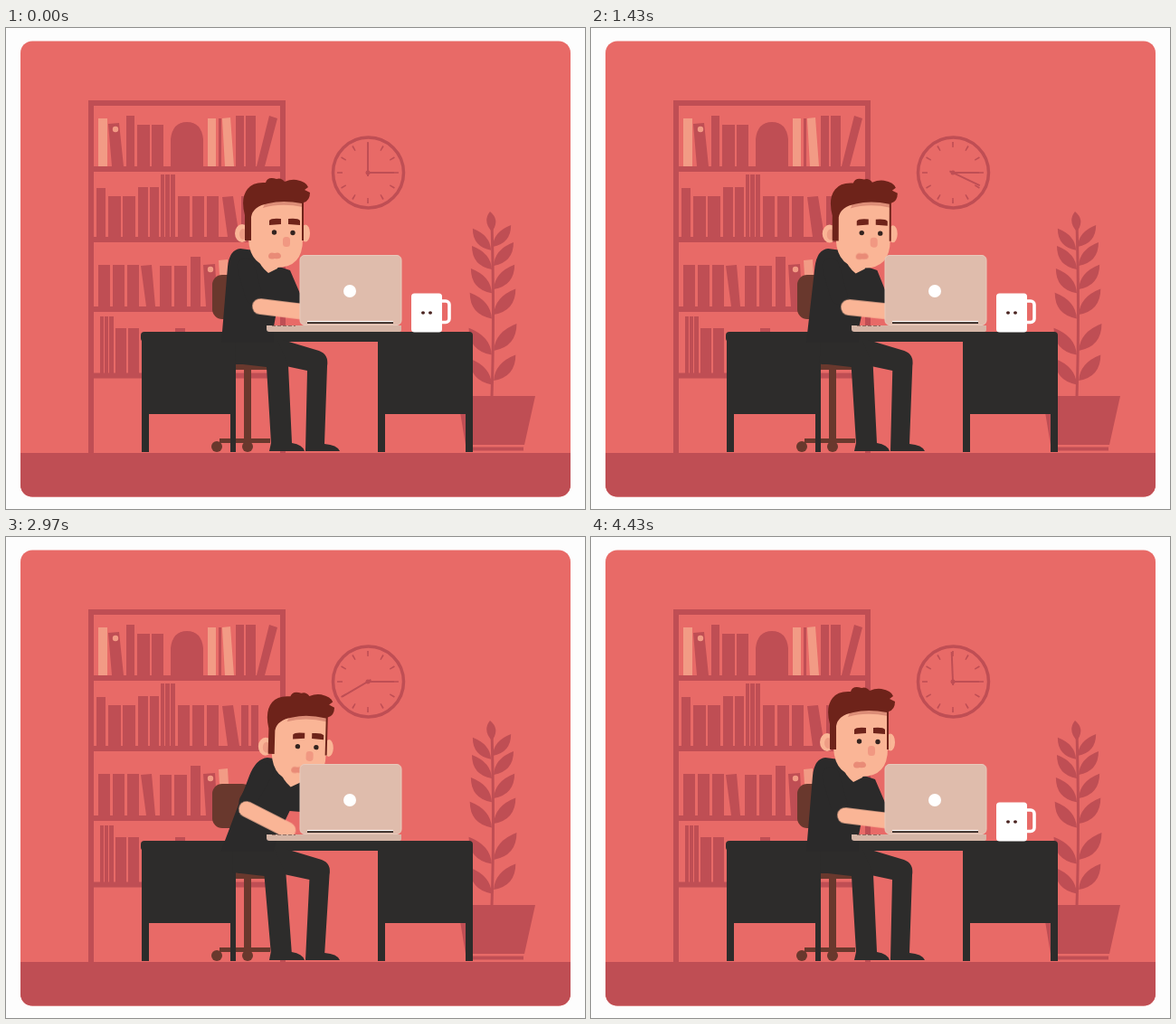
Recreate the animation shown at these times as an HTML page without scripts. Size 640 by 532 pixels, loop 4460 ms.

```html
<!DOCTYPE html>
<html lang="en">
<head>
<meta charset="utf-8">
<title>Desk work</title>
<style>
  @property --lean { syntax: '<number>'; inherits: true; initial-value: 0; }
  html, body { margin: 0; width: 100%; height: 100%; overflow: hidden; background: #fdfdfd; }
  svg { display: block; width: 100%; height: 100%; }

  .wall { fill: #e86a67; }
  .deep { fill: #bf4e54; }
  .line { fill: none; stroke: #bf4e54; }
  .peach { fill: #f29b85; }
  .dark { fill: #2d2c2b; }
  .brown { fill: #69382d; }
  .skin { fill: #fab596; }
  .hair { fill: #6e231a; }

  .minute, .man, .arm, .sleeve, .mouth, .mug { animation: 4.46s ease-in-out infinite; }
  .minute { transform-origin: 400px 160px; animation-name: turn; animation-timing-function: linear; }

  /* --lean is the sideways shift of the head in px */
  .man { animation-name: lean; }
  .head {
    transform-origin: 297px 240px;
    transform: translate(calc(var(--lean) * 1px), calc(var(--lean) * .22px)) rotate(calc(var(--lean) * .06deg));
  }
  .torso { transform-origin: 270px 346px; transform: skewX(calc(var(--lean) * -.64deg)); }
  .near, .far { transform-origin: 320px 468px; }
  .near { transform: skewX(calc(var(--lean) * .06deg)); }
  .far { transform: skewX(calc(var(--lean) * -.06deg)); }
  .arm { transform-origin: 281px 308px; animation-name: arm; }
  .sleeve { fill: none; stroke: #2b2a2a; stroke-width: 19; stroke-linecap: round; animation-name: sleeve; }
  .mouth { transform-origin: 297px 252px; animation-name: mouth; }
  .mug { transform-origin: 465px 315px; animation-name: sip; }

  @keyframes turn { to { transform: rotate(360deg); } }
  @keyframes lean {
    0%, 100% { --lean: 0; }
    19.5% { --lean: 6.5; }
    32%, 37% { --lean: 2.7; }
    48.7%, 55% { --lean: 30.5; }
    66.6% { --lean: 25.5; }
    75.6% { --lean: 12; }
  }
  @keyframes arm {
    0%, 100% { transform: translate(0, 0) rotate(7deg); }
    19.5% { transform: translate(5px, 0) rotate(7deg); }
    32%, 37% { transform: translate(4px, 1px) rotate(6deg); }
    48.7%, 55% { transform: translate(-16px, -8px) rotate(29deg); }
    66.6% { transform: translate(-15px, -7px) rotate(27deg); }
    75.6% { transform: translate(-6px, -3px) rotate(17deg); }
  }
  @keyframes sleeve {
    0%, 37%, 100% { d: path("M265 264L274 296"); }
    48.7%, 55% { d: path("M290 259L267 292"); }
    66.6% { d: path("M286 259L267 293"); }
    75.6% { d: path("M273 262L271 296"); }
  }
  @keyframes mouth {
    0%, 10%, 30%, 100% { transform: none; }
    19.5% { transform: rotate(18deg); }
  }
  @keyframes sip {
    0%, 41%, 73%, 100% { transform: translate(0, 0) rotate(0deg); }
    48.7% { transform: translate(-31px, -14px) rotate(-8deg); }
    53%, 67% { transform: translate(-72px, -18px) rotate(-8deg); }
  }
</style>
</head>
<body>
<svg viewBox="0 0 640 532" preserveAspectRatio="none">
  <defs>
    <clipPath id="card"><rect x="16" y="14.500" width="608" height="504" rx="13"/></clipPath>
    <path id="leaf" d="M0 0Q1 -18 22 -26Q22 -4 0 0"/>
    <g id="pair"><use href="#leaf" x="1"/><use href="#leaf" x="1" y="4" transform="scale(-1 1)"/></g>
  </defs>

  <g clip-path="url(#card)">
    <path class="wall" d="M16 14h608v505h-608z"/>
    <path class="deep" d="M16 470h608v49h-608z"/>
  </g>

  <g id="shelf">
    <path class="line" stroke-width="6" d="M94 470V83H306V470M94 156H306M94 234H306M94 311H306M94 384.500H306"/>
    <g class="deep">
      <path d="M113 106l12 -1 5 48h-13zM133 97h9v56h-9zM145 107h14v46h-14zM161 107h13v46h-13zM235 100h3v53h-3zM254 97h9v56h-9zM265 97h11v56h-11zM291 97l9 3 -14 53h-9z"/>
      <path d="M182 153V123Q184 104 200 104T218 123V153z"/>
      <path d="M100 177h10v54h-10zM113 186h14v45h-14zM129 186h14v45h-14zM146 176h11v55h-11zM159 176h10v55h-10zM171 162h4v69h-4zM176 162h5v69h-5zM182 162h5v69h-5zM190 186h13v45h-13zM206 186h13v45h-13zM222 186h13v45h-13zM239 187l12 -1 7 45h-13zM260 186h8v45h-8zM271 186h8v45h-8z"/>
      <path d="M102 262h13v46h-13zM118 262h13v46h-13zM134 262h13v46h-13zM149 263l12 -1 4 46h-10zM170 263h13v45h-13zM186 263h14v45h-14zM204 253h11v55h-11zM218 262l13 -1 3 47h-13z"/>
      <path d="M104 319h4v63h-4zM109 319h4v63h-4zM114 319h5v63h-5zM121 332h12v50h-12zM135 332h12v50h-12zM187 332h11v10h-11z"/>
    </g>
    <g class="peach">
      <path d="M102 100h10v53h-10zM223 100h9v53h-9zM239 100l9 -1 4 54h-10zM235 257l10 -1 3 52h-10z"/>
      <circle cx="121" cy="112" r="3.200"/><circle cx="226" cy="267" r="3.200"/>
    </g>
  </g>

  <g id="clock" class="line" stroke-width="2">
    <circle cx="400.500" cy="160" r="39" stroke-width="3.500"/>
    <!-- dash pattern yields twelve ticks -->
    <circle cx="400" cy="160" r="31" stroke-width="6" pathLength="360" stroke-dasharray="3 27" stroke-dashoffset="1.500"/>
    <path d="M400 160h29"/>
    <path class="minute" d="M400 164V127"/>
    <circle class="deep" cx="400" cy="160" r="2.500" stroke="none"/>
  </g>

  <g id="plant" class="deep">
    <path class="line" stroke-width="3" d="M537 215Q540 320 537 408"/>
    <path d="M536 224Q527 213 535 203Q546 212 538 224z"/>
    <use href="#pair" transform="translate(537 242) scale(.92)"/>
    <use href="#pair" transform="translate(538 263)"/>
    <use href="#pair" transform="translate(538 289) scale(1.050)"/>
    <use href="#pair" transform="translate(538 317) scale(1.100)"/>
    <use href="#pair" transform="translate(538 357) scale(1.150)"/>
    <use href="#pair" transform="translate(538 390) scale(1.100)"/>
    <path d="M499 407H585L573 461H508zM512 463.500h60v4h-60z"/>
  </g>

  <g id="chair" class="brown">
    <rect x="228" y="273" width="44" height="49" rx="11"/>
    <path d="M250 370h40v8h-40zM263 378h8v78h-8zM236 454h56v5h-56z"/>
    <circle cx="233" cy="463" r="6"/><circle cx="267" cy="463" r="6"/>
  </g>

  <g id="desk" class="dark">
    <rect x="149" y="336" width="367" height="11" rx="4"/>
    <path d="M150 343h104v126h-6v-42h-90v42h-8zM411 343h105v126h-8v-42h-89v42h-8z"/>
  </g>

  <g class="mug">
    <rect x="476" y="302" width="14" height="23.500" rx="4" fill="none" stroke="#fff" stroke-width="3.600"/>
    <rect x="448" y="293.500" width="34" height="43" rx="3.500" fill="#fff"/>
    <g fill="#4a2420"><ellipse cx="461" cy="315" rx="2" ry="1.700"/><ellipse cx="469" cy="315" rx="2" ry="1.700"/></g>
  </g>

  <g class="man">
    <path class="dark far" d="M254 345H306L346 357Q357 361 355 374L352 460Q366 461 369 468H331L333 379L300 372H254z"/>
    <path class="dark near" d="M254 345H300L312 373L316 459Q328 461 330 468H291L293 459L288 375L253 371z"/>
    <path class="torso" fill="#2b2a2a" d="M238 348L245 264Q247 245 259 244L282 247L291 269L302 264L314 268L326 296V305L301 303L296 330V348z"/>
    <g class="head">
      <path class="skin" d="M277 252H304L300 266L290 271Q281 264 277 252z"/>
      <ellipse class="skin" cx="261" cy="227" rx="8" ry="10"/>
      <ellipse class="skin" cx="331" cy="227" rx="5" ry="9.500"/>
      <ellipse cx="262" cy="228" rx="4" ry="6" fill="#ee9c84"/>
      <path class="skin" d="M266 190H328V234Q328 265 299 265T268 234z"/>
      <path fill="#dc8d77" d="M288 190H328V198Q304 193 284 199z"/>
      <path class="hair" d="M264 235V207Q259 188 267 178Q273 170 287 171Q289 164 299 167Q304 165 308 170Q315 167 321 168Q332 170 334 176L330 179L336 182Q336 191 329 193V235H327V194Q306 190 290 194Q273 197 271 209V235z"/>
      <path class="hair" d="M291 213Q293 210 304 211V217L291 218zM312 211Q323 210 325 213V218L312 217z"/>
      <g fill="#33231f"><circle cx="296.500" cy="226" r="2.700"/><circle cx="317" cy="226.500" r="2.700"/></g>
      <rect x="306" y="231" width="8" height="11" rx="3.500" fill="#f19882"/>
      <path class="mouth" fill="#e98b77" d="M290 252Q291 247 297 249Q303 247 304 252Q304 256 297 255Q290 257 290 252z"/>
    </g>
    <path class="sleeve" d="M265 264L274 296"/>
    <path class="arm" d="M281 308h51" fill="none" stroke="#fab596" stroke-width="17.500" stroke-linecap="round"/>
  </g>

  <g id="laptop">
    <path fill="#d5b5a6" d="M288 329H437V334Q437 336 434 336H291Q288 336 288 333z"/>
    <path d="M294 329.500H320" stroke="#8b6c62" stroke-width="1.200" stroke-dasharray="4 2"/>
    <rect x="325" y="251.500" width="112" height="77" rx="5" fill="#dfbcac" stroke="#e8cabc"/>
    <path d="M333 324.500H428" stroke="#fff" stroke-width="1.200"/>
    <path d="M333 326.200H428" stroke="#2d2421" stroke-width="1.800"/>
    <circle cx="380" cy="291" r="7" fill="#fff"/>
  </g>
</svg>
</body>
</html>
```
